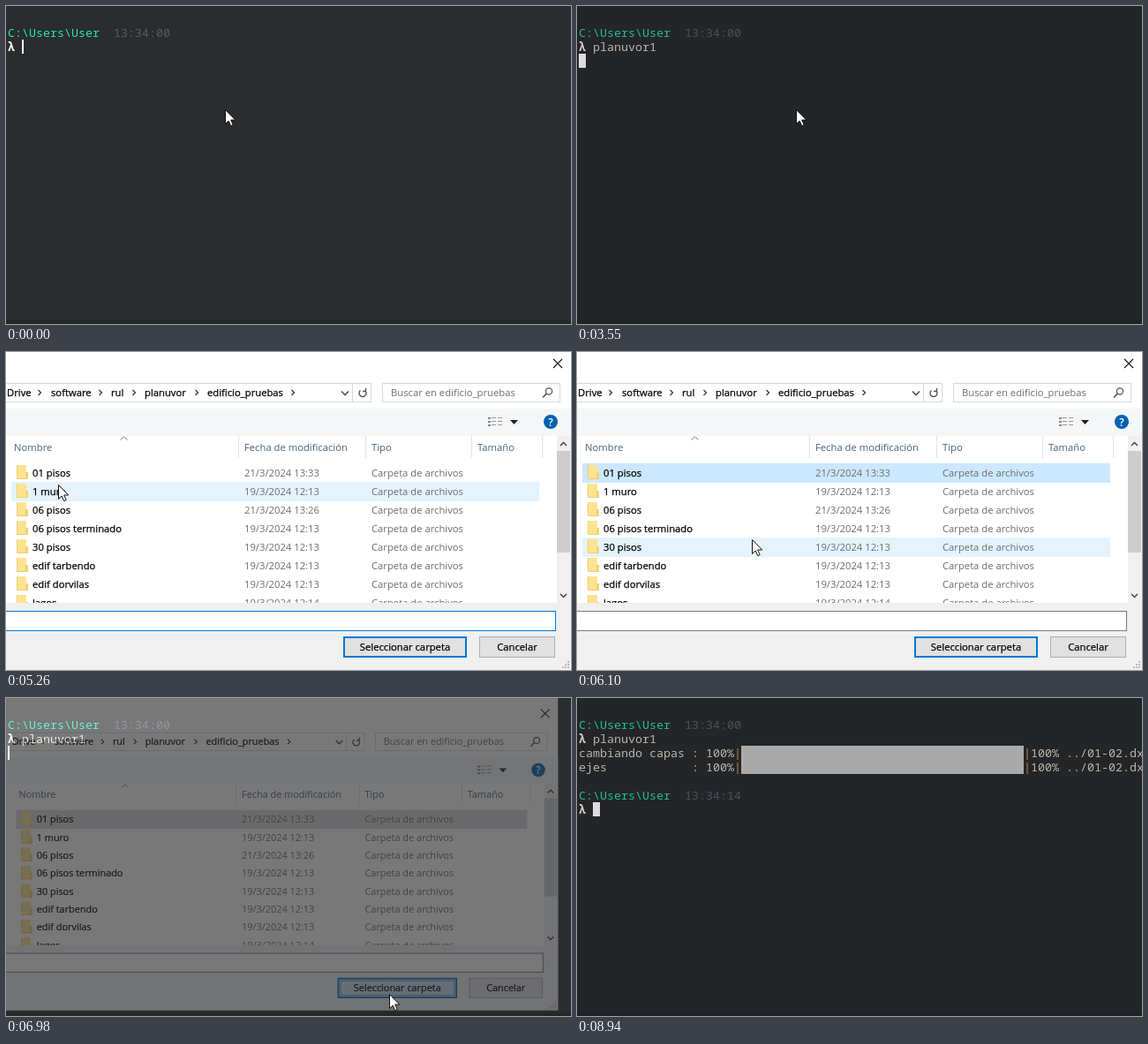
Recreate the animation shown at these times as an HTML page. Size 640 px wide and 360 px high, loop 9.03 s.

```html
<!DOCTYPE html>
<html lang="es">
<head>
<meta charset="utf-8">
<title>Terminal y selector de carpeta</title>
<style>
html, body { margin: 0; width: 100%; height: 100%; overflow: hidden; background: #2b2c2e; }
svg { display: block; width: 100%; height: 100%; }
text { white-space: pre; }
.mono { font: 13.3333px "Noto Sans Mono", monospace; }
.ui { font: 11.25px "Open Sans", sans-serif; }
.ui text[fill="#000"] { stroke: #000; stroke-width: .25px; }
</style>
</head>
<body>
<svg id="stage" viewBox="0 0 640 360"></svg>
<script>
const LOOP = 9030;
const COMMAND = 'planuvor1';
const KEY_TIMES = [590, 790, 1000, 1260, 1460, 1720, 1920, 2250, 2530];
const OPEN_STEPS = [3750, 3810, 3870, 3960, 4005, 4050];
const CLOSE_STEPS = [6940, 6980, 7010, 7045, 7080, 7120];
// time, x, y of the pointer tip
const POINTER = [
  [0, 248, 117], [4510, 248, 117], [4900, 64, 136], [5200, 64, 136], [5260, 59, 150],
  [5310, 59, 150], [5470, 58, 138], [5740, 58, 138], [6610, 434, 335], [7320, 434, 335],
  [7580, 447, 366]
];
const FOLDERS = ['01 pisos', '1 muro', '06 pisos', '06 pisos terminado', '30 pisos',
  'edif tarbendo', 'edif dorvilas', 'lagos'];
const DATES = ['21/3/2024 13:33', '19/3/2024 12:13', '21/3/2024 13:26', '19/3/2024 12:13',
  '19/3/2024 12:13', '19/3/2024 12:13', '19/3/2024 12:13', '19/3/2024 12:14'];

const TEAL = '#1de9b6', CLOCK = '#57596f', PLAIN = '#e6dccf';
const BLUE = '#0078d7', HEAD = '#4c607a', GREY = '#6d6d6d', INK = '#000';

const rect = (x, y, w, h, fill, more = '') =>
  `<rect x="${x}" y="${y}" width="${w}" height="${h}" fill="${fill}" ${more}/>`;
const box = (x, y, w, h, fill, stroke, more = '') =>
  rect(x + .5, y + .5, w - 1, h - 1, fill, `stroke="${stroke}" ${more}`);
const text = (x, y, s, fill = INK, more = '') =>
  `<text x="${x}" y="${y}" fill="${fill}" ${more}>${s}</text>`;
const line = (d, stroke, width = 1) =>
  `<path d="${d}" fill="none" stroke="${stroke}" stroke-width="${width}"/>`;
const mono = (col, row, s, fill = PLAIN, more = '') =>
  text(2 + col * 8, 35 + row * 16, s, fill, more);

function prompt(row, clock) {
  return mono(0, row, 'C:\\Users\\User', TEAL) + mono(15, row, clock, CLOCK) +
    mono(0, row + 1, 'λ', '#fff', 'font-weight="600"');
}

function progress(id, row, label) {
  return `<g id="${id}">` + mono(0, row, label.padEnd(16) + ':') +
    mono(18, row, '', PLAIN, `id="${id}Pct"`) + mono(22, row, '|', '#d9a760') +
    rect(186, 22 + row * 16, 0, 16, '#d0d0d0', `id="${id}Bar"`) +
    mono(63, row, '|', '#d9a760') + mono(64, row, '100% ../01-02.dxf') + '</g>';
}

function terminal() {
  return rect(0, 0, 640, 360, '#2b2c2e', 'id="back"') +
    rect(0, 356, 640, 4, '#000', 'opacity=".12"') +
    '<g id="shell" class="mono">' + prompt(0, '13:34:00') + mono(2, 1, '', PLAIN, 'id="typed"') +
    progress('layers', 2, 'cambiando capas') + progress('axes', 3, 'ejes') +
    `<g id="done">${prompt(5, '13:34:14')}</g></g>` +
    rect(0, 0, 2, 16, '#fff', 'id="caret"');
}

function addressBar() {
  const crumbs = [[1, 'Drive'], [51, 'software'], [119, 'rul'], [157, 'planuvor'], [228, 'edificio_pruebas']];
  return box(-30, 35, 444, 22, '#fff', '#d9d9d9') + line('M392.5 35V57', '#d9d9d9') +
    crumbs.map(([x, s]) => text(x, 50, s)).join('') +
    [38, 107, 145, 216, 325].map(x => line(`M${x - 1.5} 43l3 3l-3 3`, '#333', 1.2)).join('') +
    line('M380 44.5l4 4l4-4', '#555', 1.6) +
    line('M401.5 43.5a4 4 0 1 0 5 0M407.5 41v3.5h-3.5', '#555', 1.4) +
    box(426, 35, 202, 22, '#fff', '#d9d9d9') + text(436, 50, 'Buscar en edificio_pruebas', GREY) +
    '<circle cx="615" cy="44.5" r="3.6" fill="none" stroke="#555" stroke-width="1.2"/>' +
    line('M612.4 47.1l-4.4 4.4', '#555', 1.6) +
    line('M620 8l10 10M630 8l-10 10', '#111', 1.1);
}

function toolbar() {
  let out = rect(-30, 64, 670, 31, '#f5f6f7');
  for (const y of [74, 78, 82])
    out += rect(546, y, 3, 2, '#888') + rect(550, y, 5, 1, '#999') + rect(557, y, 5, 1, '#999');
  return out + '<path d="M571 77h9l-4.5 5z" fill="#222"/>' +
    '<circle cx="617" cy="79" r="8" fill="#0063b1"/>' +
    text(617, 83.5, '?', '#fff', 'text-anchor="middle" font-weight="600" font-size="12"');
}

function columns() {
  return `<g id="headHover">${rect(-30, 95, 294, 25, '#d9ebf9')}${line('M247.5 95V120M264 95V120', '#b5d3ea')}` +
    line('M252 106l3 3l3-3', '#345', 1.2) + '</g>' +
    line('M263.5 95V120M407.5 95V120M527.5 95V120M607.5 95V120', '#e3e3e3') +
    line('M129.5 99.5l4-3.5l4 3.5', '#777') +
    [[9, 'Nombre'], [270, 'Fecha de modificación'], [414, 'Tipo'], [534, 'Tamaño']]
      .map(([x, s]) => text(x, 112, s, HEAD)).join('');
}

function folderRow(name, i) {
  const y = 126 + i * 21;
  return rect(6, y, 598, 22, 'none', `id="row${i}"`) +
    rect(12, y + 2, 11, 16, '#ffe391') + rect(22, y + 10, 3, 8, '#f5d271') +
    line(`M12.5 ${y + 2}v15.5h12`, '#f0cf70') +
    text(30, y + 15, name) + text(270, y + 15, DATES[i], GREY) +
    text(414, y + 15, 'Carpeta de archivos', GREY);
}

function footer() {
  let grip = '';
  for (let a = 0; a < 3; a++)
    for (let b = 0; b <= a; b++) grip += rect(636 - b * 3, 350 + a * 3, 2, 2, '#bbb');
  return rect(-30, 284, 670, 76, '#f0f0f0') + box(-30, 293, 653, 23, '#fff', BLUE, 'id="field"') +
    rect(383, 323, 138, 22, '#e1e1e1', `id="accept" stroke="${BLUE}" stroke-width="2"`) +
    box(385, 325, 134, 18, 'none', '#333', 'id="focus" stroke-dasharray="1 1"') +
    text(452, 338, 'Seleccionar carpeta', INK, 'text-anchor="middle"') +
    box(536, 322, 86, 24, '#e1e1e1', '#adadad') +
    text(579, 338, 'Cancelar', INK, 'text-anchor="middle"') + grip;
}

function dialog() {
  return '<g id="dialog" class="ui">' + rect(-30, -30, 670, 390, '#fff') + addressBar() + toolbar() +
    columns() + FOLDERS.map(folderRow).join('') +
    rect(624, 95, 16, 189, '#f0f0f0') + rect(624, 112, 15, 115, '#cdcdcd') +
    line('M628 106l3.5-3.5l3.5 3.5M628 274l3.5 3.5l3.5-3.5', '#444', 1.5) + footer() + '</g>';
}

document.getElementById('stage').innerHTML = terminal() + dialog() +
  '<path id="pointer" d="M.5.5V16.5L4.2 13L6.7 18.7L9.2 17.6L6.7 12H11.7Z" fill="#fff" stroke="#111"/>';

const el = id => document.getElementById(id);
const set = (id, attrs) => { for (const k in attrs) el(id).setAttribute(k, attrs[k]); };
const show = (id, on) => set(id, { display: on ? 'inline' : 'none' });
const clamp = v => Math.max(0, Math.min(1, v));
const hold = (steps, t) => steps.reduce((last, s) => s <= t ? s : last, 0);

function pointerAt(t) {
  const i = POINTER.findIndex(k => k[0] > t);
  if (i < 0) return POINTER[POINTER.length - 1].slice(1);
  const [t0, x0, y0] = POINTER[i - 1], [t1, x1, y1] = POINTER[i];
  const p = (t - t0) / (t1 - t0), e = p * p * (3 - 2 * p);
  return [Math.round(x0 + (x1 - x0) * e), Math.round(y0 + (y1 - y0) * e)];
}

function drawCaret(t, typed, blurred) {
  let col = 2 + typed, row = 1;
  if (t >= 2890) [col, row] = [0, 2];
  if (t >= 8390) [col, row] = [0, 4];
  if (t >= 8460) [col, row] = [2, 6];
  const hidden = (t >= 100 && t < 590) || (t >= 3400 && t < 3550) || (t >= 7320 && t < 8390);
  show('caret', !hidden);
  set('caret', { x: 2 + col * 8, y: 22 + row * 16, width: blurred ? 8 : 2, fill: blurred ? '#dcdcde' : '#fff' });
}

function drawProgress(id, t, start, half, full) {
  show(id, t >= start);
  const done = t >= full ? 1 : t >= half ? .5 : 0;
  el(id + 'Pct').textContent = (done * 100 + '%').padStart(4);
  set(id + 'Bar', { width: done * 320 });
}

function drawTerminal(t) {
  const blurred = (t >= 3550 && t < 6980) || t >= 8940;
  const typed = KEY_TIMES.filter(k => k <= t).length;
  el('typed').textContent = COMMAND.slice(0, typed);
  set('back', { fill: blurred ? '#242527' : '#2b2c2e' });
  set('shell', { opacity: blurred ? .78 : 1 });
  drawProgress('layers', t, 7320, 7580, 7840);
  drawProgress('axes', t, 7870, 8120, 8320);
  show('done', t >= 8460);
  drawCaret(t, typed, blurred);
}

function drawDialog(t, x, y) {
  const visible = t >= 3750 && t < 7120;
  show('dialog', visible);
  if (!visible) return;
  let opacity = 1, scale = 1;
  if (t < 4050) {
    const left = 1 - clamp((hold(OPEN_STEPS, t) - 3710) / 340);
    opacity = 1 - left ** 2.2;
    scale = 1 - .075 * left ** 3;
  } else if (t >= 6940) {
    const left = clamp(1 - (hold(CLOSE_STEPS, t) - 6900) / 200);
    opacity = left * left;
    scale = 1 - .08 * (1 - left);
  }
  set('dialog', { opacity, transform: `translate(179 155) scale(${scale}) translate(-179 -155)` });

  const chosen = t >= 5740, pressed = t >= 6710;
  show('headHover', y < 120);
  const over = y >= 126 && y < 284 ? Math.floor((y - 126) / 21) : -1;
  FOLDERS.forEach((_, i) => {
    let fill = i === over ? '#e5f3ff' : 'none';
    if (i === 0 && chosen) fill = pressed ? '#d9d9d9' : '#cce8ff';
    set('row' + i, { fill });
  });
  set('field', { stroke: chosen ? '#7a7a7a' : BLUE });
  const onButton = x >= 382 && x < 522 && y >= 322;
  set('accept', { fill: pressed ? '#cce4f7' : onButton ? '#e5f1fb' : '#e1e1e1' });
  show('focus', pressed);
}

function draw(t) {
  const [x, y] = pointerAt(t);
  drawTerminal(t);
  drawDialog(t, x, y);
  set('pointer', { transform: `translate(${x} ${y})` });
}

const begin = performance.now();
function tick() {
  draw((performance.now() - begin) % LOOP);
  requestAnimationFrame(tick);
}
tick();
</script>
</body>
</html>
```
